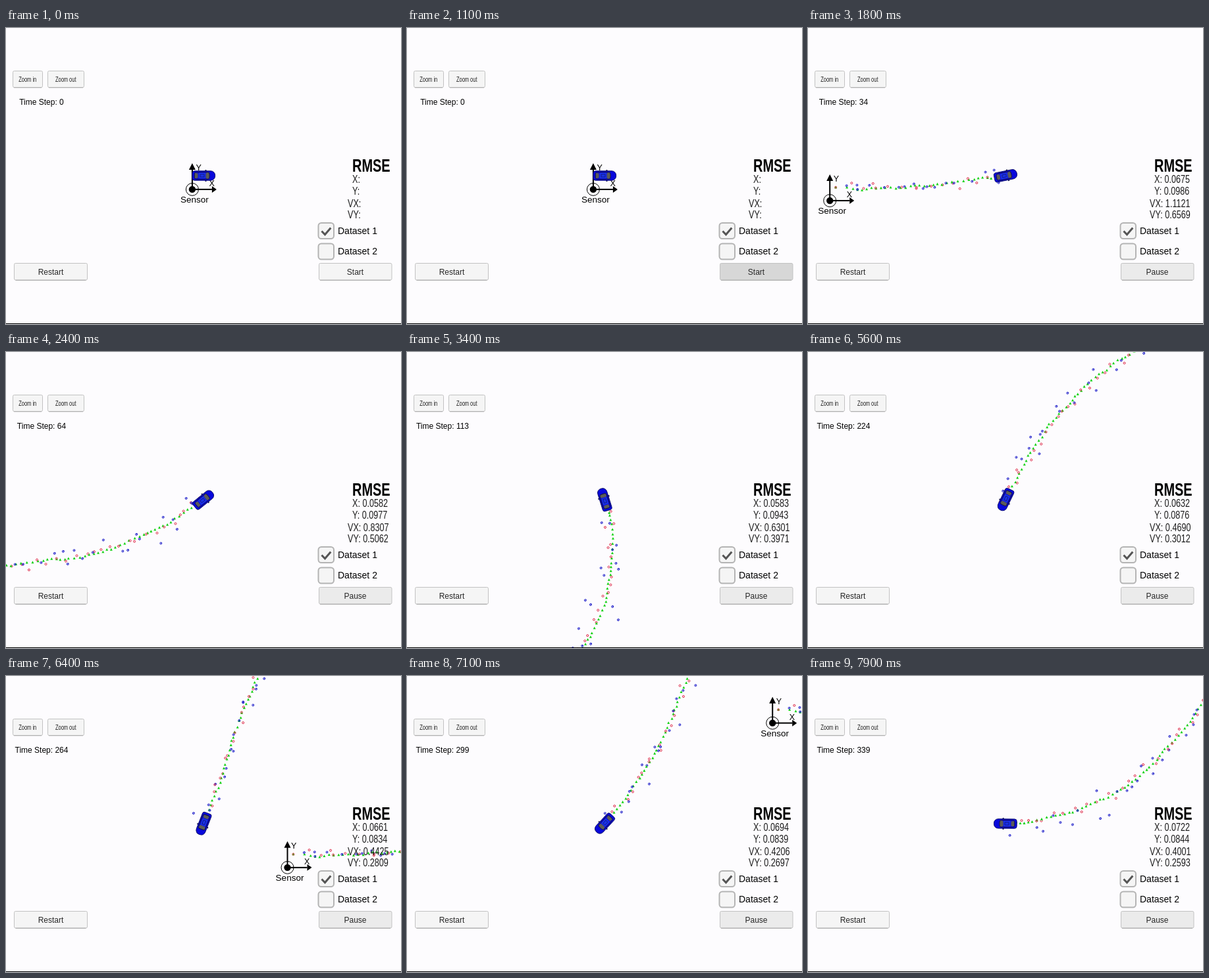
An HTML page with a canvas for the animation above (8 s loop, 600 px wide and 451 px high).

```html
<!DOCTYPE html>
<html lang="en">
<head>
<meta charset="utf-8">
<title>Sensor tracking simulator</title>
<style>
  html, body { margin: 0; width: 600px; height: 451px; overflow: hidden; background: #fdfcfe; }
  canvas, svg { position: absolute; left: 0; top: 0; display: block; }
  text { font-family: "Liberation Sans", Arial, sans-serif; }
  .button { fill: #f5f5f5; stroke: #c2c2c2; }
  .label { font-size: 12px; fill: #282828; text-anchor: middle; }
  .small { font-size: 11px; fill: #202020; text-anchor: middle; }
  .value { font-size: 16px; fill: #1c1c1c; }
  .option { font-size: 14px; fill: #000; }
  .box { fill: #f5f5f5; stroke: #b4b4b4; stroke-width: 2; }
</style>
</head>
<body>
<canvas id="world" width="600" height="451"></canvas>
<svg width="600" height="451" viewBox="0 0 600 451">
  <g>
    <rect class="button" x="10.5" y="65.5" width="45" height="25" rx="2"/>
    <rect class="button" x="63.5" y="65.5" width="55" height="25" rx="2"/>
    <rect class="button" x="12.5" y="358.5" width="111" height="25.5" rx="2"/>
    <rect class="button" id="runBox" x="475.5" y="358.5" width="110.5" height="25.5" rx="2"/>
    <path d="M12 90.8h42M65 90.8h52M14.5 384.3h107M477 384.3h107" stroke="#a8a8a8" fill="none"/>
  </g>
  <text class="small" transform="translate(32.7 82) scale(.68 1)">Zoom in</text>
  <text class="small" transform="translate(90.7 82) scale(.68 1)">Zoom out</text>
  <text class="label" x="68" y="375.5">Restart</text>
  <text class="label" id="runLabel" x="530.5" y="375.5">Start</text>
  <text class="label" id="counter" x="54" y="116.7" style="fill:#000">Time Step: 0</text>

  <text transform="translate(526 219) scale(.745 1)" font-size="26.8" font-weight="bold">RMSE</text>
  <g id="values"></g>

  <rect class="box" x="474.5" y="297" width="23.5" height="24" rx="4.5"/>
  <rect class="box" x="474.5" y="328.5" width="23.5" height="24" rx="4.5"/>
  <path d="M479.5 309.5l5 5.2l8.8-10.2" fill="none" stroke="#555" stroke-width="3"/>
  <text class="option" x="504" y="314">Dataset 1</text>
  <text class="option" x="504" y="345">Dataset 2</text>
  <rect y="450" width="600" height="1"/>
</svg>
<script>
const LOOP = 8000, FRAME = 100, SCALE = 28.5, DT = 0.05, STEPS = 345;
const CAR = { x: 300, y: 225 };
const ctx = document.getElementById('world').getContext('2d');
const byId = id => document.getElementById(id);

// Piecewise linear lookup in a list of [x, y] points
function lerp(points, x) {
  let i = 1;
  while (i < points.length - 1 && points[i][0] < x) i++;
  const [x0, y0] = points[i - 1], [x1, y1] = points[i];
  return y0 + (y1 - y0) * Math.max(0, (x - x0) / (x1 - x0));
}

const stepTable = [[1100, 0], [1200, 4], [2400, 64], [3400, 113], [4700, 180], [6400, 264], [7900, 339]];

// Running sums of squared error by time step
const marks = [1, 5, 64, 113, 180, 264, 339];
const errors = [
  { name: 'X',  x: 526, y: 236, sums: [.0828, .095, .2168, .3841, .6118, 1.1535, 1.7672] },
  { name: 'Y',  x: 526, y: 254, sums: [.0004, .06, .6109, 1.0049, 1.5905, 1.8363, 2.4148] },
  { name: 'VX', x: 519, y: 273, sums: [27.04, 40, 44.164, 44.864, 46.616, 51.692, 54.267] },
  { name: 'VY', x: 519, y: 290, sums: [0, 13, 16.399, 17.818, 19.769, 20.831, 22.794] }
];
for (const e of errors) {
  e.node = document.createElementNS('http://www.w3.org/2000/svg', 'text');
  e.node.setAttribute('class', 'value');
  e.node.setAttribute('transform', `translate(${e.x} ${e.y}) scale(.79 1)`);
  e.points = marks.map((n, i) => [n, e.sums[i]]);
  byId('values').append(e.node);
}

let seed = 20;
function random() {
  seed = (seed * 1664525 + 1013904223) % 4294967296;
  return seed / 4294967296;
}
const noise = sd => sd * (random() + random() + random() + random() - 2) * Math.sqrt(3);

// Figure-eight drive: turn rate and speed are sinusoids
const track = [];
let x = 0.6, y = 0.6, yaw = 0, driftX = 0, driftY = 0;
for (let i = 0; i < STEPS; i++) {
  const phase = 2 * Math.PI * (i + 1) / 500;
  const turn = 0.55 * Math.sin(phase) * DT;
  const travel = (5 + 0.2 * Math.cos(2 * phase)) * DT;
  const p = { x, y, yaw, laser: i % 2 === 0 };
  if (p.laser) {
    p.mx = x + noise(0.15);
    p.my = y + noise(0.15);
  } else {
    const range = Math.hypot(x, y) + noise(0.3);
    const bearing = Math.atan2(y, x) + noise(0.03);
    p.mx = range * Math.cos(bearing);
    p.my = range * Math.sin(bearing);
  }
  // The estimate drifts slowly around the true place
  driftX = 0.8 * driftX + noise(0.03);
  driftY = 0.8 * driftY + noise(0.035);
  p.ex = x + driftX;
  p.ey = y + driftY;
  track.push(p);
  x += travel * Math.cos(yaw + turn / 2);
  y += travel * Math.sin(yaw + turn / 2);
  yaw += turn;
}
Object.assign(track[0], { mx: .3122, my: .5803, ex: .3122, ey: .5803 });

function fillPath(color, ...pts) {
  ctx.fillStyle = color;
  ctx.beginPath();
  pts.forEach(p => ctx.lineTo(p[0], p[1]));
  ctx.closePath();
  ctx.fill();
}

function ring(x, y, r, color, width) {
  ctx.strokeStyle = color;
  ctx.lineWidth = width;
  ctx.beginPath();
  ctx.arc(x, y, r, 0, 7);
  ctx.stroke();
}

function drawSensor(x, y) {
  ctx.save();
  ctx.translate(x, y);
  ring(0, 0, 9.5, '#000', 1);
  ctx.fillStyle = '#000';
  ctx.beginPath();
  ctx.arc(0, 0, 5.2, 0, 7);
  ctx.fill();
  ctx.fillRect(-1, -32, 2, 32);
  ctx.fillRect(0, -1, 30, 2);
  fillPath('#000', [-5, -30], [0, -40], [5, -30]);
  fillPath('#000', [30, -5], [37, 0], [30, 5]);
  ctx.font = '12.5px "Liberation Sans", Arial, sans-serif';
  ctx.fillText('Y', 5.5, -29);
  ctx.fillText('X', 25.5, -5);
  ctx.font = '13.5px "Liberation Sans", Arial, sans-serif';
  ctx.textAlign = 'center';
  ctx.fillText('Sensor', 3.5, 20);
  ctx.restore();
}

function drawCar(angle) {
  ctx.save();
  ctx.translate(CAR.x, CAR.y);
  ctx.rotate(-angle);
  // Mirrors, body, windows, roof
  fillPath('#10104a', [2.5, -9], [4.5, -8.8], [4.5, 8.8], [2.5, 9]);
  ctx.fillStyle = '#0808dc';
  ctx.strokeStyle = '#0a0a64';
  ctx.lineWidth = .9;
  ctx.beginPath();
  ctx.roundRect(-17.2, -7.2, 34.8, 14.4, [3.5, 6.5, 6.5, 3.5]);
  ctx.fill();
  ctx.stroke();
  fillPath('#5c5c58', [-13.5, -4.2], [-8.5, -3.6], [-8.5, 3.6], [-13.5, 4.2]);
  fillPath('#5c5c58', [3.5, -4], [8.3, -5.2], [9.3, 0], [8.3, 5.2], [3.5, 4]);
  ctx.strokeStyle = '#14143c';
  ctx.beginPath();
  ctx.roundRect(-13.8, -5.4, 22.8, 10.8, 3);
  ctx.stroke();
  ctx.fillStyle = '#1a32e6';
  ctx.fillRect(-7.5, -4.2, 10.5, 8.4);
  ctx.strokeStyle = '#10106e';
  ctx.lineWidth = .7;
  ctx.strokeRect(-5, -2, 6, 4);
  ctx.restore();
}

function drawWorld(step) {
  const here = track[step];
  const sx = v => CAR.x + (v - here.x) * SCALE;
  const sy = v => CAR.y - (v - here.y) * SCALE;
  ctx.clearRect(0, 0, 600, 451);
  drawSensor(sx(0), sy(0) + 3.8);
  for (let i = 0; step && i <= step; i++) {
    const p = track[i], ex = sx(p.ex), ey = sy(p.ey), mx = sx(p.mx), my = sy(p.my);
    fillPath('#14d214', [ex - 2, ey + 1.8], [ex, ey - 2], [ex + 2, ey + 1.8]);
    ring(mx, my, 1.5, p.laser ? '#dc2040' : '#1c1cc8', 1);
    if (!p.laser) {
      ctx.beginPath();
      ctx.moveTo(mx - .5, my + .3);
      ctx.lineTo(mx + 1.5, my - 1);
      ctx.stroke();
    }
  }
  drawCar(here.yaw);
}

function render(time) {
  const step = Math.round(lerp(stepTable, time));
  drawWorld(step);
  byId('counter').textContent = 'Time Step: ' + step;
  byId('runLabel').textContent = step ? 'Pause' : 'Start';
  byId('runBox').style.fill = time < 1000 ? '#f5f5f5' : time === 1100 ? '#d7d7d7' : '#ebebeb';
  for (const e of errors) {
    const rms = step ? Math.sqrt(lerp(e.points, step) / step).toFixed(4) : '';
    e.node.textContent = `${e.name}: ${rms}`;
  }
}

let shown = -1;
function tick() {
  const time = Math.floor(performance.now() % LOOP / FRAME) * FRAME;
  if (time !== shown) render(shown = time);
  requestAnimationFrame(tick);
}
tick();
</script>
</body>
</html>
```
